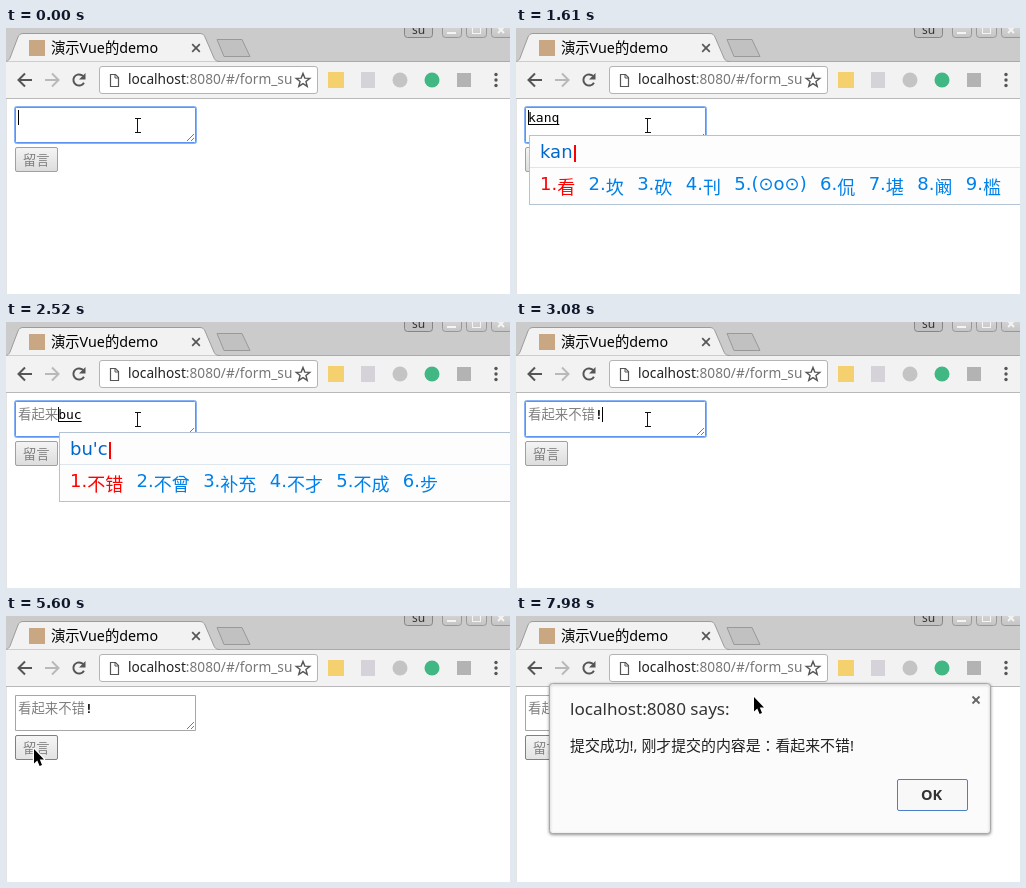
These frames come from a looping animation (504x266 px, 8 s). An HTML page with a canvas:

```html
<!DOCTYPE html>
<html lang="ja">
<head>
<meta charset="utf-8">
<title>演示Vue的demo</title>
<style>
html, body { margin: 0; width: 100%; height: 100%; overflow: hidden; background: #fff; }
canvas { display: block; width: 504px; height: 266px; }
</style>
</head>
<body>
<canvas id="stage" width="504" height="266"></canvas>
<script>
const c = document.getElementById('stage').getContext('2d', { alpha: false });
const LOOP = 8000, STEP = 70;
const CJK = '"Noto Sans CJK JP", "Noto Sans CJK SC", "Noto Sans CJK", sans-serif';
const UI = '"Noto Sans", "Open Sans", ' + CJK;
const IME = '"DejaVu Sans", sans-serif';
const MONO = '"DejaVu Sans Mono", monospace';

// Time, typed letters, letters shown in the popup, candidates
const typing = [
  [1120, 'k'],
  [1190, 'k', 'k', '看 可 开 卡 靠 快 口 块 考'],
  [1330, 'ka', 'ka', '卡 咖 喀 咔 佧 胩 咯 看 开'],
  [1400, 'kan', 'kan', '看 坎 砍 刊 (⊙o⊙) 侃 堪 阚 槛'],
  [1610, 'kanq', 'kan', '看 坎 砍 刊 (⊙o⊙) 侃 堪 阚 槛'],
  [1680, 'kanq', "kan'q", '看起 看清 看去 看齐 看其 看轻 看全'],
  [1750, 'kanqi', "kan'qi", '看起 看齐 刊期 看其 看棋 坎炁 看'],
  [1890, 'kanqil', "kan'qi", '看起 看齐 刊期 看其 看棋 坎炁 看'],
  [1960, 'kanqil', "kan'qi'l", '看起来 看起 看齐 刊期 看其 看棋 坎炁'],
  [2100, 'kanqilai', "kan'qi'lai", '看起来 看起 看齐 刊期 看其 看棋 坎炁'],
  [2240, ''],
  [2310, 'b', 'b', '不 吧 把 被 比 并 本 别 部'],
  [2450, 'bu', 'bu', '不 部 步 布 补 捕 埠 簿 怖'],
  [2520, 'buc', "bu'c", '不错 不曾 补充 不才 不成 步'],
  [2590, 'bucu', "bu'cu", '不错 不粗 不促 不存 不 部 步'],
  [2660, 'bucuo', "bu'cuo", '不错 步错 不 部 步 布 补 捕'],
  [2940, '']
];

function rect(x, y, w, h, fill) {
  c.fillStyle = fill;
  c.fillRect(x, y, w, h);
}

function box(x, y, w, h, r, fill, edge) {
  c.beginPath();
  c.roundRect(x + .5, y + .5, w - 1, h - 1, r);
  c.fillStyle = fill;
  c.fill();
  c.lineWidth = 1;
  c.strokeStyle = edge;
  c.stroke();
}

function poly(points, fill, edge, width = 1, close = true) {
  c.beginPath();
  points.forEach(([x, y]) => c.lineTo(x, y));
  if (close) c.closePath();
  if (fill) { c.fillStyle = fill; c.fill(); }
  if (edge) { c.lineWidth = width; c.strokeStyle = edge; c.stroke(); }
}

function dot(x, y, r, fill) {
  c.beginPath();
  c.arc(x, y, r, 0, 7);
  c.fillStyle = fill;
  c.fill();
}

// Draws text and returns the x where it ends
function text(s, x, y, font, fill) {
  c.font = font;
  c.fillStyle = fill;
  c.fillText(s, x, y);
  return x + c.measureText(s).width;
}

function fade(y0, y1, from, to) {
  const g = c.createLinearGradient(0, y0, 0, y1);
  g.addColorStop(0, from);
  g.addColorStop(1, to);
  return g;
}

function cross(x, y, r, color, width) {
  poly([[x - r, y - r], [x + r, y + r]], null, color, width, false);
  poly([[x - r, y + r], [x + r, y - r]], null, color, width, false);
}

function tabs() {
  rect(0, 0, 504, 34, '#cbcbcb');
  rect(0, 33, 504, 1, '#aaa');
  box(398, -6, 29, 16, 3, '#c2c2c2', '#858585');
  text('su', 406, 6, '12px ' + UI, '#333');
  for (const [x, w] of [[436, 20], [460, 21], [485, 24]]) {
    box(x, -6, w, 16, 3, fade(0, 10, '#d2d2d2', '#c4c4c4'), '#989898');
  }
  rect(441, 4, 9, 2, '#f4f4f4');
  c.strokeStyle = '#f4f4f4';
  c.strokeRect(466.5, -.5, 8, 6);
  cross(495, 2, 3, '#f4f4f4', 2);

  poly([[211, 11.5], [236, 11.5], [244, 28.5], [218, 28.5]], '#c1c1c1', '#999');

  c.beginPath();
  c.moveTo(-2, 33.5);
  c.bezierCurveTo(2, 33.5, 3, 32, 4, 30);
  c.lineTo(12, 9);
  c.bezierCurveTo(13, 7, 14, 5.5, 17, 5.5);
  c.lineTo(194, 5.5);
  c.bezierCurveTo(197, 5.5, 198, 7, 199, 9);
  c.lineTo(208, 30);
  c.bezierCurveTo(209, 32, 210, 33.5, 214, 33.5);
  c.fillStyle = '#f2f2f2';
  c.fill();
  c.lineWidth = 1;
  c.strokeStyle = '#9c9c9c';
  c.stroke();

  rect(23, 12, 16, 16, '#c9a782');
  text('演示Vue的demo', 45, 25, '14.3px ' + UI, '#000');
  cross(190, 20, 3.8, '#555', 1.7);
}

function arrowIcon(x, dir, color) {
  poly([[x - 7 * dir, 52], [x + 6 * dir, 52]], null, color, 2, false);
  poly([[x, 45.5], [x + 6.5 * dir, 52], [x, 58.5]], null, color, 2, false);
}

function toolbar() {
  rect(0, 34, 504, 36, '#f2f2f2');
  rect(0, 70, 504, 1, '#b9b9b9');
  arrowIcon(19, -1, '#555');
  arrowIcon(46, 1, '#b9b9b9');

  c.beginPath();
  c.arc(73, 52, 5.6, .5, 5.5);
  c.lineWidth = 2;
  c.strokeStyle = '#555';
  c.stroke();
  poly([[79.5, 45], [79.5, 51.5], [73, 51.5]], '#555');

  box(93, 38, 219, 28, 2.5, '#fff', '#b4b4b4');
  poly([[104.5, 46.5], [109.5, 46.5], [112.5, 49.5], [112.5, 58.5], [104.5, 58.5]], null, '#555', 1.2);
  poly([[109, 47], [109, 50], [112, 50]], null, '#555', 1, false);
  const font = '13.7px ' + UI;
  const x = text('localhost', 122, 56, font, '#222');
  text(':8080/#/form_su', x, 56, font, '#777');

  const star = Array.from({ length: 10 }, (_, i) => {
    const a = i * Math.PI / 5 - Math.PI / 2, r = i % 2 ? 3.1 : 7.2;
    return [297 + r * Math.cos(a), 52.6 + r * Math.sin(a)];
  });
  poly(star, null, '#555', 1.4);

  rect(322, 44, 16, 16, '#f4d06f');
  rect(355, 44, 14, 16, '#d5d3d9');
  dot(394, 52, 7.5, '#c4c4c4');
  dot(426, 52, 7.5, '#41b883');
  rect(451, 45, 14, 14, '#b3b3b3');
  for (const y of [46.5, 52, 57.5]) dot(490, y, 1.7, '#555');
}

function page(t) {
  rect(0, 71, 504, 195, '#fff');
  rect(0, 71, 1, 195, '#e4e4e4');
  const focus = t < 5460, hover = t >= 4970, press = t >= 5460 && t < 5600;

  if (focus) box(8, 78, 183, 38, 2, '#86b3f7', '#86b3f7');
  box(9, 79, 181, 36, focus ? 1 : 0, '#fff', focus ? '#5a94f0' : '#a6a6a6');
  poly([[181, 113], [188, 106]], null, '#777', 1, false);
  poly([[185, 113], [188, 110]], null, '#777', 1, false);

  const fill = press ? fade(119, 144, '#ddd', '#eee')
    : hover ? fade(119, 144, '#f6f6f6', '#e2e2e2') : fade(119, 144, '#f5f5f5', '#dcdcdc');
  box(9, 119, 43, 25, 1.5, fill, hover ? '#808080' : '#a0a0a0');
  text('留言', 17, 137, '13.3px ' + CJK, '#808080');
}

function popup(x, y, letters, words) {
  rect(x, y, 520, 70, '#fdfdfd');
  c.lineWidth = 1;
  c.strokeStyle = '#b3c3d3';
  c.strokeRect(x + .5, y + .5, 520, 69);
  rect(x + 1, y + 32, 519, 1, '#dde6ec');
  const end = text(letters, x + 11, y + 23, '18px ' + IME, '#0066cc');
  rect(Math.round(end + 1), y + 10, 2, 17, '#f00');
  let left = x + 11;
  words.split(' ').forEach((word, i) => {
    const color = i ? '#0080e8' : '#f00';
    const han = word.charCodeAt(0) > 0x2e80;
    left = text(i + 1 + '.', left, y + 55, '18px ' + IME, color);
    left = text(word, left, y + (han ? 59 : 55), '18px ' + (han ? CJK : IME), color) + 13.4;
  });
}

function input(t) {
  const now = typing.filter(k => k[0] <= t).pop();
  const done = t < 2240 ? '' : t < 2940 ? '看起来' : '看起来不错';
  const x = 12 + done.length * 13.4;
  const drop = done ? 3 : 0;
  if (done) text(done, 12, 97, '13.4px ' + CJK, '#808080');

  let caret = x;
  if (t >= 3080) {
    text('!', x, 97, 'bold 13px ' + MONO, '#111');
    caret = 86;
  }
  const on = t < 840 || (t >= 1120 && t < 3850) || (t >= 4410 && t < 5040);
  if (on) rect(Math.floor(caret), 82 + drop, 1, 15, '#000');

  if (now && now[1]) {
    const end = text(now[1], x, 94 + drop, '13px ' + MONO, '#000');
    rect(x, 96 + drop, end - x, 1, '#000');
    if (now[2]) popup(Math.floor(x) + 1, 107 + drop, now[2], now[3]);
  }
}

function dialog(t) {
  if (t < 6720) return;
  c.save();
  c.globalAlpha = t < 6790 ? .35 : t < 6860 ? .75 : 1;
  c.shadowColor = 'rgba(0,0,0,.35)';
  c.shadowBlur = 3;
  c.shadowOffsetY = 1;
  box(33, 67, 442, 151, 3, '#fbfbfb', '#a8a8a8');
  c.shadowColor = 'transparent';
  text('localhost:8080 says:', 54, 99, '17.1px ' + UI, '#333');
  text('提交成功!, 刚才提交的内容是：看起来不错!', 54, 135, '14.9px ' + UI, '#222');
  cross(460, 84, 3.5, '#666', 1.8);
  box(381, 163, 71, 32, 1.5, '#f8f8f8', '#4b80c8');
  text('OK', 405, 184, 'bold 14.5px ' + UI, '#333');
  c.restore();
}

// Share of a stepped move, counting the first step as moved
function moved(t, start, steps) {
  return Math.max(0, Math.min(1, (Math.floor((t - start) / STEP) + 1) / steps));
}

function pointer(t) {
  const a = moved(t, 4340, 12), b = moved(t, 5180, 2), d = moved(t, 7490, 8);
  const ease = a * a * (3 - 2 * a);
  let x = 132 - 105 * ease + b;
  let y = 97 + 34 * ease + b;
  if (d) {
    const e = d * d * (3 - 2 * d);
    x = 28 + 210 * e;
    y = 132 + 34 * e * (1 - e) - 52 * e * e;
  }

  if (y < 115 && !d) {
    x = Math.round(x);
    y = Math.round(y);
    rect(x - 4, y - 8, 8, 4, '#fff');
    rect(x - 4, y + 5, 8, 4, '#fff');
    rect(x - 2, y - 7, 3, 15, '#fff');
    rect(x - 3, y - 7, 6, 1, '#111');
    rect(x - 3, y + 7, 6, 1, '#111');
    rect(x - 1, y - 7, 1, 15, '#111');
    return;
  }
  const shape = [[0, 0], [0, 14.6], [3.3, 11.6], [5.6, 17], [8, 16], [5.8, 10.6], [10, 10.4]];
  const placed = shape.map(([u, v]) => [x + u, y + v + 1]);
  c.lineJoin = 'round';
  poly(placed, null, '#fff', 2.4);
  poly(placed, '#000');
  c.lineJoin = 'miter';
}

function draw() {
  const t = performance.now() % LOOP;
  tabs();
  toolbar();
  page(t);
  input(t);
  dialog(t);
  pointer(t);
  requestAnimationFrame(draw);
}
draw();
</script>
</body>
</html>
```
